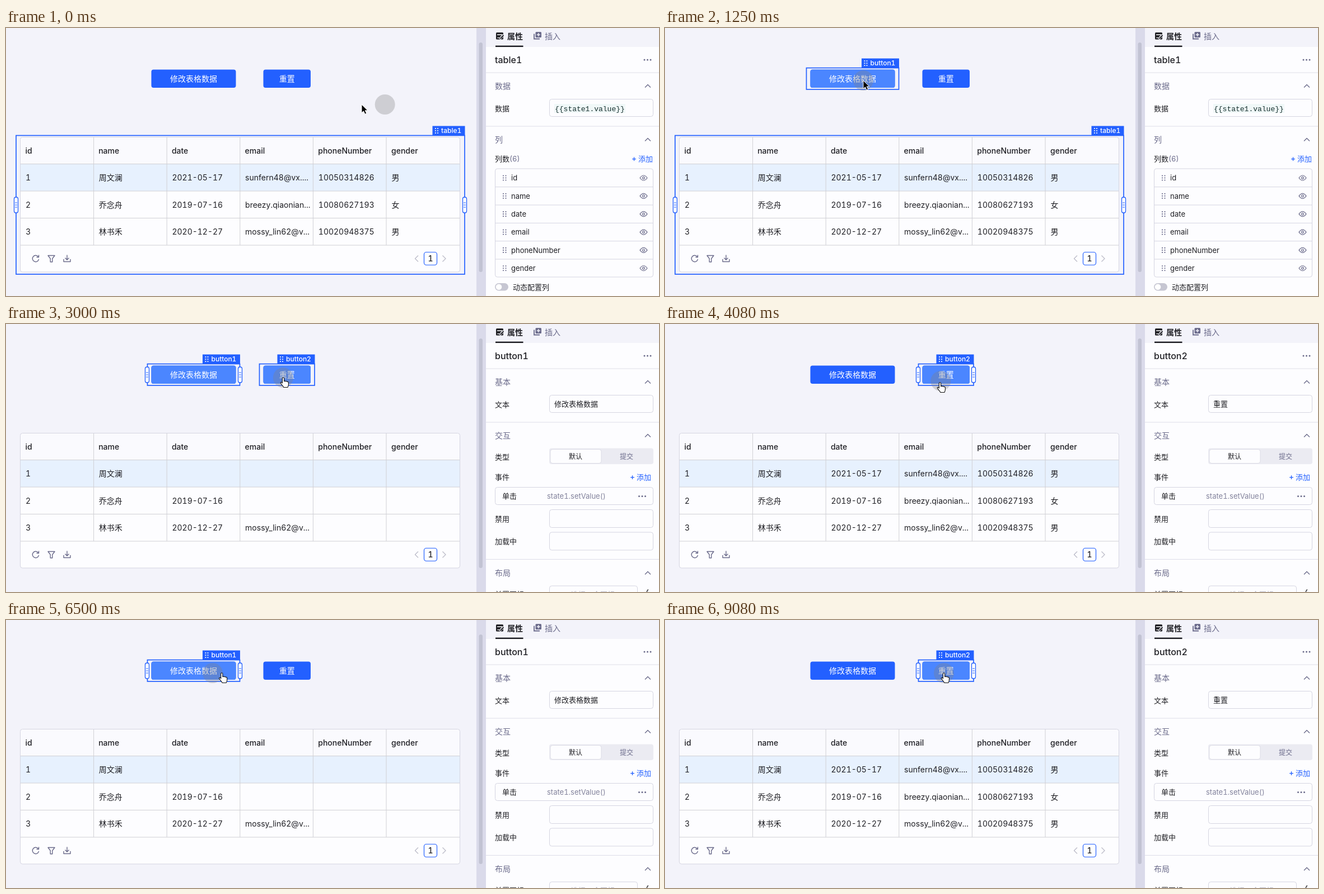
Recreate the animation shown at these times as an HTML page. Size 1166x480 px, loop 9330 ms.

```html
<!DOCTYPE html>
<html lang="zh">
<head>
<meta charset="utf-8">
<style>
  html, body { margin: 0; width: 100%; height: 100%; overflow: hidden; background: #f3f3fa; }
  svg { display: block; font-family: Inter, "Noto Sans CJK SC", "Noto Sans CJK", sans-serif; font-variant-numeric: tabular-nums; }
</style>
</head>
<body>
<svg id="stage" width="1166" height="480" viewBox="0 0 1166 480"></svg>
<script>
const BLUE = '#2360ff', INK = '#1f1f24', MUTED = '#6b6b8b', EDGE = '#d5d5e1', PAPER = '#fdfdff';

const rect = (x, y, w, h, fill, more = '') =>
  `<rect x="${x}" y="${y}" width="${w}" height="${h}" fill="${fill}" ${more}/>`;
const path = (d, stroke = EDGE, more = '') =>
  `<path d="${d}" fill="none" stroke="${stroke}" ${more}/>`;
// y is the vertical middle of the text
const text = (x, y, s, size = 13, fill = INK, more = '') =>
  `<text x="${x}" y="${y + size * .36}" font-size="${size}" fill="${fill}" ${more}>${s}</text>`;
const group = (id, body) => `<g id="${id}">${body}</g>`;
const mid = 'text-anchor="middle"', semi = 'font-weight="500"', bold = 'font-weight="600"';

const dots = (x, y, dx, dy, cols, rows, r, fill) => {
  let s = '';
  for (let i = 0; i < cols * rows; i++)
    s += `<circle cx="${x + i % cols * dx}" cy="${y + Math.floor(i / cols) * dy}" r="${r}" fill="${fill}"/>`;
  return s;
};
const more = (x, y) => dots(x - 5.5, y, 5.5, 0, 3, 1, 1.5, MUTED);
const field = (x, y, w, h) => rect(x + .5, y + .5, w - 1, h - 1, PAPER, `stroke="${EDGE}" rx="4"`);
const section = (y, s) =>
  text(873, y, s, 14, MUTED, semi) + path(`M1141 ${y + 2.5}l5-5 5 5`, MUTED, 'stroke-width="1.3"');
const divider = y => path(`M857 ${y + .5}H1166`, '#dedee8');
const add = (x, y) => text(x, y, '+', 14, BLUE, semi) + text(x + 12, y, '添加', 13, BLUE);

// Selection frame with its name tag; handles sit on both sides
const outline = (x, y, w, h, name, tagW) =>
  rect(x, y, w, h, 'none', `stroke="${BLUE}" stroke-width="1.7"`) +
  rect(x + w - tagW + .5, y - 17, tagW, 17, BLUE) +
  dots(x + w - tagW + 6, y - 12.5, 4, 4, 2, 3, 1.1, '#fff') +
  text(x + w - tagW + 16, y - 8.5, name, 12, '#fff', semi);
const handle = (x, y) =>
  rect(x - 3.5, y - 14, 7, 28, '#fff', `rx="3" stroke="${BLUE}" stroke-width="1.3"`) +
  path(`M${x - 2} ${y - 4}h4m-4 4h4m-4 4h4`, BLUE);
const handles = (x, w, y) => handle(x, y) + handle(x + w, y);

const button = (id, x, w, label) =>
  rect(x, 74.5, w, 32.5, BLUE, 'rx="4"') +
  rect(x, 74.5, w, 32.5, '#4b86ff', `rx="4" id="light${id}"`) +
  text(x + w / 2, 91, label, 14, '#fff', mid);

const headers = ['id', 'name', 'date', 'email', 'phoneNumber', 'gender'];
const rows = [
  ['1', '周文澜', '2021-05-17', 'sunfern48@vx....', '10050314826', '男'],
  ['2', '乔念舟', '2019-07-16', 'breezy.qiaonian...', '10080627193', '女'],
  ['3', '林书禾', '2020-12-27', 'mossy_lin62@v...', '10020948375', '男'],
];
const colX = c => 34.5 + c * 130.7;

function table() {
  let s = rect(25.5, 195.5, 785, 241.5, PAPER, 'rx="4"') +
    rect(26, 196, 784, 47.5, '#fafafe', 'rx="4"') + rect(26, 244, 784, 48, '#e7f1fe');
  for (const y of [243.5, 292, 340.5, 389]) s += path(`M26 ${y}H810`, '#d0d0d4');
  for (let c = 1; c < 6; c++) s += path(`M${26 + c * 130.6} 196V389`, '#d0d0d4');
  s += rect(25.5, 195.5, 785, 241.5, 'none', `stroke="${EDGE}" rx="4"`);
  headers.forEach((h, c) => s += text(colX(c), 220, h, 14, INK, semi));
  // The edited data keeps only the lower left part of the cells
  rows.forEach((row, r) => row.forEach((v, c) =>
    s += text(colX(c) + .5, 268 + r * 48.5, v, 14, INK, c > r + 1 ? 'class="extra"' : '')));
  const pen = 'stroke-width="1.4" stroke-linejoin="round"';
  s += path('M57.5 409.5A5.7 5.7 0 1 0 58.6 414M58.5 406.5V410.5H54.5', MUTED, pen) +
    path('M75 407.5H87L82.8 413V419H79.2V413Z', MUTED, pen) +
    path('M109 406.5V415M105.5 411.8L109 415.2 112.5 411.8M103 414V418.5H115V414', MUTED, pen) +
    path('M736 407.5L730.5 413 736 418.5M779.5 407.5L785 413 779.5 418.5', '#bdbdca', pen) +
    rect(746.5, 401.5, 23, 23, '#fff', `rx="4" stroke="${BLUE}" stroke-width="1.2"`) +
    text(758, 413, '1', 14, INK, mid + ' ' + semi);
  return s;
}

function tablePanel() {
  let s = text(873, 57, 'table1', 16, INK, semi) + section(104, '数据') + text(873, 144, '数据') +
    field(970, 127, 186, 32) + rect(979, 136, 127, 16, '#f0f8f8') +
    text(980, 144, '{{state1.value}}', 13, '#17302f', 'font-family="Liberation Mono, monospace"') +
    section(200, '列') + text(873, 234, '列数') + text(899, 234, '(6)', 13, MUTED) + add(1117, 234) +
    field(873, 251.5, 283, 195);
  headers.forEach((h, i) => {
    const y = 268.5 + i * 32.35;
    if (i) s += path(`M874 ${y - 16.2}H1155`);
    s += dots(888, y - 4, 4.5, 4, 2, 3, 1.1, MUTED) + text(902, y, h) +
      path(`M1132 ${y}Q1138.5 ${y - 9} 1145 ${y}Q1138.5 ${y + 9} 1132 ${y}Z`, MUTED, 'stroke-width="1.2"') +
      `<circle cx="1138.5" cy="${y}" r="1.9" fill="none" stroke="${MUTED}" stroke-width="1.2"/>`;
  });
  return s + rect(873, 457, 24, 13.5, '#c6c6d2', 'rx="6.7"') +
    '<circle cx="880" cy="463.7" r="5.3" fill="#fff"/>' + text(905, 464, '动态配置列');
}

function buttonPanel() {
  return `<text id="title" x="873" y="62.8" font-size="16" fill="${INK}" ${semi}></text>` +
    section(104, '基本') + text(873, 144, '文本') + field(970, 127, 186, 32) +
    `<text id="caption" x="979" y="147.8" font-size="13" fill="${INK}"></text>` +
    section(200, '交互') + text(873, 238, '类型') +
    rect(970, 222.5, 186, 28.5, '#ebebf2', 'rx="4"') +
    rect(972, 224.5, 91, 25, PAPER, 'rx="4" stroke="#dcdce6"') +
    text(1017, 237.5, '默认', 12, INK, mid + ' ' + semi) + text(1108, 237.5, '提交', 12, MUTED, mid) +
    text(873, 274, '事件') + add(1114, 274) +
    field(873, 292, 283, 32) + text(886, 308.5, '单击') +
    text(966, 308.5, 'state1.setValue()', 13, '#83839c') + more(1136, 308.5) +
    text(873, 349, '禁用') + field(970, 332, 186, 33) +
    text(873, 389.5, '加载中') + field(970, 372.5, 186, 33) +
    divider(421) + section(446, '布局') +
    text(873, 484, '前置图标') + field(970, 468.5, 158, 33) +
    text(1009, 484, '选择一个图标', 13, '#b4b4c4') + path('M1147 476Q1144 476 1143 488', INK, 'stroke-width="1.4"');
}

const stage = document.getElementById('stage');
stage.innerHTML =
  rect(0, 0, 1166, 480, '#f3f3fa') +
  table() + button(1, 259.5, 151, '修改表格数据') + button(2, 459.5, 84.5, '重置') +
  group('tableFrame', outline(18, 192.5, 801, 248.5, 'table1', 58) + handles(18, 801, 317)) +
  group('frame1', outline(252.5, 71.5, 165, 38.5, 'button1', 67)) + group('handles1', handles(252, 166, 91)) +
  group('frame2', outline(452.5, 71.5, 98.5, 38.5, 'button2', 67)) + group('handles2', handles(452, 99, 91)) +
  rect(840, 0, 17, 480, '#dadaea') + rect(844.5, 26, 6.5, 411, '#c2c3d3', 'rx="3.2"') +
  rect(857, 34, 309, 446, PAPER) +
  rect(875, 8, 13, 12.5, INK, 'rx="1.5"') +
  path('M877 12H886M877.5 17.5H880', '#fff', 'stroke-width="1.5"') +
  path('M881.5 19.5L888.5 12.5', '#f3f3fa', 'stroke-width="4"') + path('M882.5 19L888.5 13', INK, 'stroke-width="2"') +
  text(895, 14.5, '属性', 14, INK, bold) + rect(874, 31.5, 49.5, 2.5, INK) +
  path('M943 10.5V19.5H953', MUTED, 'stroke-width="1.8"') + rect(945.5, 7, 10.5, 10, MUTED, 'rx="1.5"') +
  path('M947.7 12H953.8M950.7 9V15', '#f3f3fa', 'stroke-width="1.5"') +
  text(962, 14.5, '插入', 14, MUTED, semi) + more(1145.5, 57) + divider(79.5) + divider(175.5) +
  group('tablePanel', tablePanel()) + group('buttonPanel', buttonPanel()) +
  '<circle id="halo" r="18" fill="#7f7f7f" fill-opacity=".32"/>' +
  '<path id="arrow" d="M0 0V15L3.5 11.8 6 17.2 8.7 16 6.3 10.8H11Z" fill="#000" stroke="#fff"/>' +
  '<path id="hand" d="M-1.6 9.5V1.4a1.6 1.6 0 0 1 3.2 0V6.5q1.5-1 2.8.3 1.5-.7 2.6.6 2-.4 2.4 1.2v4q0 2-1.5 4.9h-7q-1-2.2-3-4.2l-2.6-3.4q-.3-2 1.9-1.4z" fill="#fff" stroke="#111" stroke-width="1.1"/>';

// Keys are [ms, value, ...]
function at(keys, t) {
  const i = keys.findIndex(k => k[0] > t);
  if (i < 0) return keys[keys.length - 1].slice(1);
  if (i === 0) return keys[0].slice(1);
  const a = keys[i - 1], b = keys[i], u = (t - a[0]) / (b[0] - a[0]);
  return a.slice(1).map((v, n) => v + (b[n + 1] - v) * u);
}
const pointer = [
  [-84, 677, 137], [0, 635, 137], [170, 570, 157], [420, 470, 138], [670, 390, 108], [920, 354, 94],
  [1920, 354, 94], [2167, 415, 106], [2250, 430, 107], [2500, 462, 110], [2750, 488, 101], [2920, 495, 96],
  [3830, 495, 96], [4080, 491, 105], [4500, 491, 105], [4750, 450, 101], [5000, 382, 96], [5085, 369, 95],
  [6420, 369, 95], [6670, 420, 95], [6920, 488, 95], [7085, 498, 95],
];
const lights = {
  1: [[670, 0], [920, 1], [3500, 1], [3750, 0], [4830, 0], [5080, 1], [7670, 1], [7920, 0]],
  2: [[2500, 0], [2750, 1], [5580, 1], [5830, 0], [6750, 0], [7000, 1]],
};
const captions = { 1: '修改表格数据', 2: '重置' };
const $ = id => document.getElementById(id);
const show = (el, on) => el.style.display = on ? '' : 'none';
const place = (el, [x, y]) => el.setAttribute('transform', `translate(${x} ${y})`);
const extras = [...document.querySelectorAll('.extra')];

const LOOP = 9330, STEP = 1000 / 12;
function draw() {
  const step = Math.floor((performance.now() % LOOP + 4) / STEP), t = step * STEP;
  const selected = step < 16 ? 0 : step < 42 ? 1 : step < 67 ? 2 : step < 92 ? 1 : 2;
  const edited = step >= 18 && step < 44 || step >= 68 && step < 94;
  const tip = at(pointer, t), [x, y] = tip;
  const over = y < 71 || y > 111 ? 0 : x > 252 && x < 418 ? 1 : x > 452 && x < 552 ? 2 : 0;

  for (const b of [1, 2]) {
    $('light' + b).setAttribute('opacity', at(lights[b], t)[0]);
    show($('frame' + b), selected === b || over === b);
    show($('handles' + b), selected === b);
  }
  show($('tableFrame'), !selected);
  show($('tablePanel'), !selected);
  show($('buttonPanel'), selected);
  if (selected) {
    $('title').textContent = 'button' + selected;
    $('caption').textContent = captions[selected];
  }
  extras.forEach(el => show(el, !edited));

  const useHand = over && selected;
  show($('hand'), useHand);
  show($('arrow'), !useHand);
  place($('hand'), tip);
  place($('arrow'), tip);
  place($('halo'), at(pointer, t - STEP));
  requestAnimationFrame(draw);
}
draw();
</script>
</body>
</html>
```
